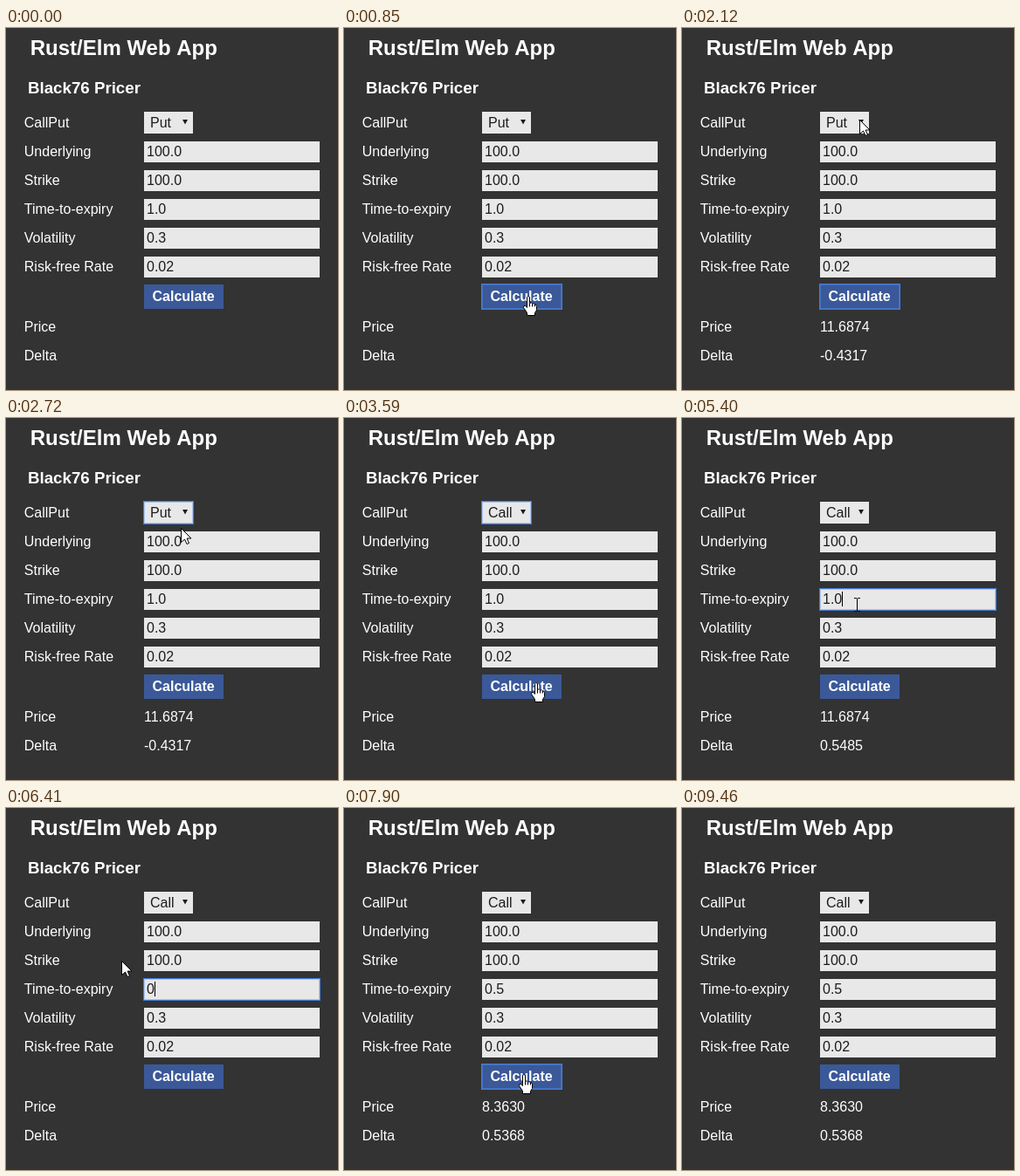
Write an HTML page with a canvas that moves like this. It is 380x415 px and loops after 9.53 s.

```html
<!DOCTYPE html>
<html lang="en">
<head>
<meta charset="utf-8">
<title>Black76 Pricer</title>
<style>
html, body { margin: 0; width: 100%; height: 100%; overflow: hidden; background: #333; }
canvas { display: block; }
</style>
</head>
<body>
<canvas id="stage" width="380" height="415"></canvas>
<script>
const ctx = document.getElementById('stage').getContext('2d');
const LOOP = 9530, TICK = 77.5, ROW = 33;
const FONT = '"Liberation Sans", Arial, sans-serif';
const INK = '#1c1c1c', PAPER = '#e8e8e8', RING = '#4d90fe';

const LABELS = ['CallPut', 'Underlying', 'Strike', 'Time-to-expiry', 'Volatility', 'Risk-free Rate'];
const baseline = row => 114 + ROW * row;
const field = row => ({ x: 158, y: 97 + ROW * row, w: 201, h: 24 });
const SELECT = { x: 158, y: 96, w: 56, h: 25 };
const BUTTON = { x: 158, y: 294, w: 91, h: 28 };
const FIELDS = [1, 2, 3, 4, 5].map(field);
const TIME = FIELDS[2];

// What the user changes, and when.
const START = { focus: null, kind: 'Put', expiry: '1.0', selected: false, priced: false };
const EVENTS = [
  [850, { focus: BUTTON }],
  [930, { priced: true }],
  [2350, { focus: SELECT }],
  [2890, { kind: 'Call', priced: false }],
  [3910, { focus: BUTTON }],
  [3990, { priced: true }],
  [5150, { focus: TIME }],
  [5550, { selected: true }],
  [6410, { expiry: '0', selected: false, priced: false }],
  [6490, { expiry: '0.' }],
  [6730, { expiry: '0.5' }],
  [7820, { focus: BUTTON }],
  [7900, { priced: true }],
  [9460, { focus: null }]
];

// Pointer moves: start, end, destination.
const ENTRY = [283, 432];
const MOVES = [
  [70, 390, [222, 318]],
  [540, 850, [210, 307]],
  [930, 1320, [201, 207]],
  [1470, 2120, [203, 105]],
  [2350, 2720, [200, 126]],
  [2890, 3590, [219, 303]],
  [4140, 4520, [197, 158]],
  [4690, 5400, [200, 214]],
  [5550, 5705, [122, 212]],
  [5782, 5860, [132, 175]],
  [7280, 7590, [205, 305]],
  [8440, 8830, [326, 405]]
];

const stateAt = t => Object.assign({}, START, ...EVENTS.filter(e => e[0] <= t).map(e => e[1]));

function pointerAt(t) {
  const i = MOVES.filter(m => m[0] <= t).length - 1;
  if (i < 0 || t >= MOVES[MOVES.length - 1][1]) return null;
  const [start, end, to] = MOVES[i];
  const from = i ? MOVES[i - 1][2] : ENTRY;
  const steps = Math.round((end - start) / TICK) + 1;
  const done = Math.min(steps, 1 + Math.floor((t - start) / (end - start) * (steps - 1) + 1e-6));
  const p = 1 - (1 - done / steps) ** 2;
  return from.map((a, axis) => Math.round(a + (to[axis] - a) * p));
}

function normalCdf(x) {
  let term = x, sum = x;
  for (let n = 3; n < 30; n += 2) sum += term *= x * x / n;
  return 0.5 + sum * Math.exp(-x * x / 2) / Math.sqrt(2 * Math.PI);
}

function black76(kind, expiry) {
  const price = 100, strike = 100, vol = 0.3, rate = 0.02;
  const sign = kind === 'Call' ? 1 : -1;
  const spread = vol * Math.sqrt(expiry);
  const d1 = Math.log(price / strike) / spread + spread / 2;
  const discount = Math.exp(-rate * expiry);
  const delta = sign * discount * normalCdf(sign * d1);
  const cost = sign * discount * strike * normalCdf(sign * (d1 - spread));
  return [price * delta - cost, delta].map(v => v.toFixed(4));
}

const inside = (b, x, y) => x >= b.x && x < b.x + b.w && y >= b.y && y < b.y + b.h;

function rect(x, y, w, h, color) {
  ctx.fillStyle = color;
  ctx.fillRect(x, y, w, h);
}

const box = (b, color) => rect(b.x, b.y, b.w, b.h, color);

function text(str, x, y, color = '#fff', style = '16px') {
  ctx.font = style + ' ' + FONT;
  ctx.fillStyle = color;
  ctx.fillText(str, x, y);
}

function ring(b) {
  ctx.lineWidth = 1;
  ctx.strokeStyle = RING;
  [[0.5, 0.8], [-0.5, 0.4]].forEach(([out, alpha]) => {
    ctx.globalAlpha = alpha;
    ctx.strokeRect(b.x - out, b.y - out, b.w + 2 * out, b.h + 2 * out);
  });
  ctx.globalAlpha = 1;
}

const ARROW = new Path2D('M0 0V16L4 12.5L6.5 18L9 17L6.6 11.5H11.5Z');
const HAND = new Path2D('M-1 1Q0-1 2 1V8Q4 6.5 5 8.5Q7 7.5 8 9.5Q10 9 10 11V16L8 19V22H-1V19' +
  'L-5 13Q-5 10-3 11L-1 13ZM2 8V12M5 8.5V12M8 9.5V12');

function shape(path, x, y) {
  ctx.save();
  ctx.translate(x + 0.5, y + 0.5);
  ctx.lineWidth = 1;
  ctx.lineJoin = 'round';
  ctx.fillStyle = '#fff';
  ctx.strokeStyle = '#000';
  ctx.fill(path);
  ctx.stroke(path);
  ctx.restore();
}

function textCursor(x, y) {
  rect(x, y - 7, 1, 14, '#000');
  for (const dy of [-8, 7]) {
    rect(x - 3, y + dy, 3, 1, '#000');
    rect(x + 1, y + dy, 3, 1, '#000');
  }
}

function drawPointer(t) {
  const pos = pointerAt(t);
  if (!pos) return;
  const dragging = t >= 5550 && t < 5782;
  if (inside(BUTTON, ...pos)) shape(HAND, ...pos);
  else if (dragging || FIELDS.some(f => inside(f, ...pos))) textCursor(...pos);
  else shape(ARROW, ...pos);
}

function drawExpiry({ expiry, selected, focus }) {
  const y = baseline(3);
  ctx.font = '16px ' + FONT;
  const width = Math.round(ctx.measureText(expiry).width);
  if (selected) rect(161, y - 14, width, 18, '#3390ff');
  text(expiry, 161, y, selected ? '#fff' : INK);
  if (focus === TIME && !selected) rect(161 + width, y - 14, 1, 17, '#000');
}

function drawSelect(kind) {
  box(SELECT, PAPER);
  text(kind, 165, baseline(0), INK);
  ctx.beginPath();
  ctx.moveTo(202, 105);
  ctx.lineTo(208, 105);
  ctx.lineTo(205, 110.5);
  ctx.fill();
}

function draw(t) {
  const state = stateAt(t);
  rect(0, 0, 380, 415, '#333');
  text('Rust/Elm Web App', 27.7, 31, '#fff', 'bold 24px');
  text('Black76 Pricer', 25, 74.5, '#fff', 'bold 18.72px');
  LABELS.forEach((label, row) => text(label, 20.8, baseline(row)));

  drawSelect(state.kind);
  FIELDS.forEach(f => box(f, PAPER));
  ['100.0', '100.0', '', '0.3', '0.02'].forEach((v, i) => text(v, 161, baseline(i + 1), INK));
  drawExpiry(state);

  box(BUTTON, '#3b5998');
  text('Calculate', 167.5, 313, '#fff', 'bold 16px');

  const results = state.priced ? black76(state.kind, +state.expiry) : ['', ''];
  ['Price', 'Delta'].forEach((label, i) => {
    const y = baseline(7 + i) + 3;
    text(label, 20.8, y);
    text(results[i], 158, y);
  });

  if (state.focus) ring(state.focus);
  drawPointer(t);
}

const begin = performance.now();
function tick() {
  draw((performance.now() - begin) % LOOP);
  requestAnimationFrame(tick);
}
tick();
</script>
</body>
</html>
```
